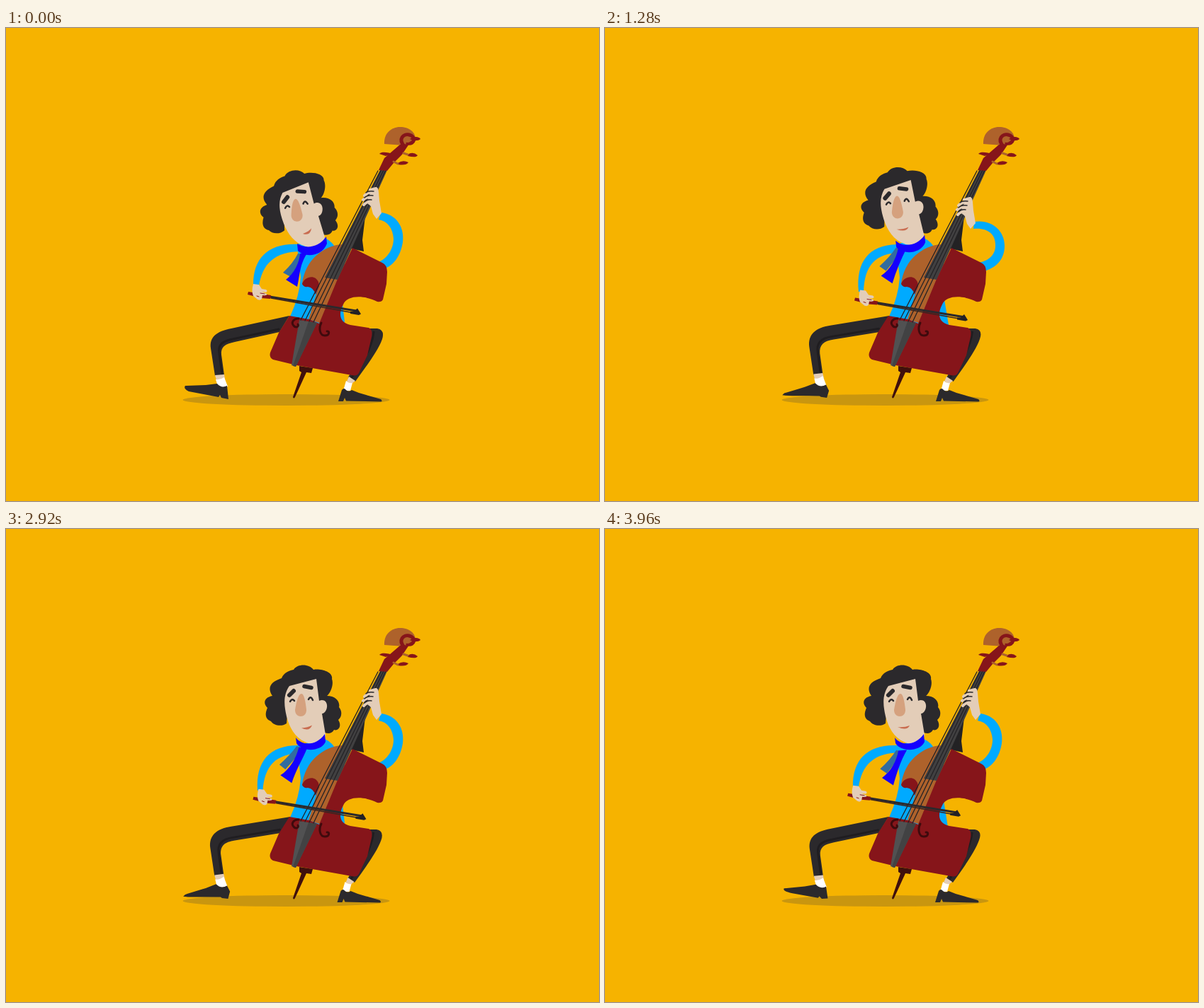
Recreate the animation shown at these times as an HTML page. Size 837x669 px, loop 4000 ms.

```html
<!DOCTYPE html>
<html lang="en">
<head>
<meta charset="utf-8">
<title>Cellist</title>
<style>
html, body { margin: 0; width: 100%; height: 100%; overflow: hidden; background: #f6b300; }
svg { display: block; width: 100%; height: 100%; }
.black { fill: #2b292c; } .skin { fill: #e3cdb8; } .blue { fill: #00aaff; }
.red { fill: #86151a; } .tan { fill: #ae622b; } .royal { fill: #1400ff; }
.line { fill: none; stroke-linecap: round; stroke-linejoin: round; }
.ink { stroke: #2b292c; }
</style>
</head>
<body>
<svg viewBox="0 0 837 669">
  <ellipse cx="395.5" cy="526" rx="146" ry="8" fill="#c9960f"/>

  <!-- legs -->
  <path id="thigh" class="black"/>
  <path id="thighShade" class="line" stroke="#1f1d20" stroke-width="3"/>
  <path id="ankle" class="skin"/>
  <path id="sock" fill="#fff"/>
  <path id="shoe" class="black"/>
  <path id="rightLeg" class="black"/>
  <path id="rightShade" class="line" stroke="#1f1d20" stroke-width="3"/>
  <g id="rightFoot">
    <path class="skin" d="M484 493L493 499L488 503L481 500Z"/>
    <path fill="#fff" d="M480 499Q484 503 489 502L486 513H476Z"/>
    <path class="black" d="M469 528L474 512Q477 508 480 512Q484 515 488 512L498 516L529 525Q532 528 529 528.500L480 527.500L478 523L476 528Z"/>
  </g>

  <!-- torso, sleeves, scarf and head -->
  <path id="fretSleeve" class="blue"/>
  <path id="torso" class="blue"/>
  <path id="bowSleeve" class="blue"/>
  <path id="scarfBack" fill="#326c9f"/>
  <path id="scarfFront" class="royal"/>
  <g id="head">
    <path class="black" d="M396 275C389 280 378 278 374 272C366 269 365 262 369 253C362 246 365 238 376 236C368 224 374 216 389 211C392 203 400 200 406 199C412 190 428 191 434 199C444 197 462 202 460 212C463 220 458 232 453 236C465 236 472 244 470 252C475 258 474 266 469 270C475 280 468 286 463 284C460 290 453 290 448 287L438 240V225L400 230Z"/>
    <path class="skin" d="M400 222L438 212L442 243C449 240 454 245 453 252C452 259 448 261 446 261L451 291C449 306 431 306 422 301C408 295 400 281 396 265C391 244 393 232 400 222Z"/>
    <path class="line ink" stroke-width="6" d="M400 235L406 229"/>
    <path class="line ink" stroke-width="5.500" d="M421 222.500L431 224.500"/>
    <path class="line ink" stroke-width="2.500" d="M401 244Q404 239 407 243M427 241Q430 235 433 242"/>
    <path fill="#d5a17e" d="M417 233C412 233 409 249 408 256C408 268 424 268 424 256C423 246 421 233 417 233Z"/>
    <path id="mouth" fill="#c96c50"/>
  </g>
  <path id="collar" class="royal"/>

  <!-- cello -->
  <path d="M508 258L503 300L505 316L487 312Z" fill="#232224"/>
  <path class="tan" d="M474 306C448 308 422 328 418 362L441 366L437 380L427 412L445 418L480 345Z"/>
  <path class="red" d="M489 311L531 332Q538 335 538 345L537 362L532 384Q530 388 524 387C507 378 482 377 476 391C468 406 472 417 486 420L512 424Q518 427 516 437L510 463L498 488Q495 493 488 491L410 477L377 469Q371 466 373 459L385 431L400 407L428 412L442 418L468 355Z"/>
  <path class="red" d="M418 362C421 353 431 350 437 354Q442 358 442 365L437 377Q434 367 426 366Q420 367 418 362Z"/>
  <path d="M529 199L538 201L468 356L450 353Z" fill="#414041"/>
  <path d="M414 413L439 417L409 479L403 477Z" fill="#515152"/>
  <path d="M427 415L439 417L409 479L405 478Z" fill="#424243"/>
  <path class="line" stroke="#242225" stroke-width="1.300" d="M525 202L416 413M530 200L422 414M533 201L428 415M536 201L434 416"/>
  <path class="line" stroke="#3f0a0d" stroke-width="3" d="M445 417C441 425 443 435 450 435C457 435 457 428 453 429M413 411C406 410 402 417 406 421C409 425 414 422 412 419"/>
  <path d="M414 478L433 481L431 488L424 487L408 522Q406 525 405 522L417 487L414 485Z" fill="#40100c"/>
  <path class="tan" d="M534 164C533 149 544 140 556 140C569 140 579 147 578 160L562 166Z"/>
  <path class="red" d="M526 201L534 184L556 165L569 164L559 179L547 191L538 202Z"/>
  <path class="line" stroke="#86151a" stroke-width="5" d="M562 167C553 157 561 149 569 151C579 153 577 165 567 163"/>
  <circle class="tan" cx="567" cy="158" r="4"/>
  <path class="red" d="M570 157C576 152 584 154 585 157C582 160 575 160 570 157ZM527 178C530 174 540 176 546 178L536 181ZM567 179Q574 174 581 180Q579 184 567 181ZM553 191Q560 186 568 190Q565 195 553 193Z"/>
  <path class="line" stroke="#ae622b" stroke-width="3" d="M561 177L567 179M547 189L553 192"/>

  <!-- hands and bow -->
  <g id="fretHand">
    <path class="skin" d="M520 227Q525 222 526 232L527 244L530 262L523 270L518 263L515 252L509 247L513 236Z"/>
    <path class="line" stroke="#e3cdb8" stroke-width="4" d="M522 227L514 229M521 233Q511 231 506 237M520 239Q511 237 504 243M518 246Q510 244 505 250"/>
    <path class="line ink" stroke-width="1.500" d="M519 231Q511 230 508 233M518 237Q510 236 506 240M516 243Q510 242 506 246"/>
  </g>
  <g id="bow">
    <path class="line" stroke="#2b292c" stroke-width="3" d="M372 380L494 400"/>
    <path class="line" stroke="#3b2520" stroke-width="1.500" d="M374 382L491 403"/>
    <path fill="#242225" d="M486 401L491 401L496 396.500L501 404.500L498 406L486 404Z"/>
    <path class="red" d="M342 373L374 378L373 383L360 382L341 377Z"/>
    <path class="skin" d="M349 362L357 363L361 369L367 370Q370 372 367 374L361 373L368 376Q369 379 362 378L361 383Q359 386 355 384L349 379Q346 372 349 362Z"/>
    <path class="line" stroke="#86151a" stroke-width="1" d="M359 375L365 376M354 379L357 380"/>
  </g>
</svg>
<script>
const LOOP = 4000, STEP = 40;
const keyTimes = [0, 480, 1280, 1920, 2560, 3280, 3960];
const tracks = {
  tilt:  [1, .3, .57, .3, 0, 0, 0],
  sink:  [6, 1.5, 3, 1.5, 0, 0, 0],
  foot:  [0, .3, .7, 1, 1, .45, .15],
  step:  [0, -2, -2, -2, -3, 0, -3],
  bow:   [0, 1, 1, 1, 1, .35, .1],
  fret:  [0, .6, 1, .6, 0, 0, 0],
  scarf: [1, .15, .4, .1, 0, .3, .55],
  waist: [0, 1, 1, .4, 0, 0, .8],
  smile: [0, 0, 1, 0, 0, 1, 1]
};

// Each path moves between two poses, driven by one track.
const morphs = {
  thigh: ["foot",
    "M400 407L318 425C297 429 287 437 289 453L295 492L308 491L304 462C303 451 309 447 323 444L386 430Z",
    "M402 407L318 419C296 422 286 433 288 450L294 490L307 488L303 460C302 447 308 441 323 439L388 430Z"],
  thighShade: ["foot",
    "M385 426L320 440C304 443 299 449 301 460L305 490",
    "M387 425L320 435C304 437 298 445 300 458L304 488"],
  ankle: ["foot",
    "M295 491L308 490L309 497L297 498Z",
    "M294 489L307 487L309 495L296 497Z"],
  sock: ["foot",
    "M296 497Q302 498 308 494L313 507Q306 511 299 507Z",
    "M295 495Q301 496 307 491L312 504Q305 508 297 505Z"],
  shoe: ["foot",
    "M253 506L282 505L298 503Q304 510 312 506L314 525L304 523L302 519L300 522L258 514Q250 510 253 506Z",
    "M253 521L282 509L296 502Q303 509 312 504Q317 508 317 523L306 523L304 520L302 523L257 525Q249 525 253 521Z"],
  rightLeg: ["step",
    "M508 425L524 425Q535 427 531 440C525 457 508 479 493 500L483 494L500 464Z",
    "M508 425L522 425Q533 427 528 440C522 457 506 479 491 500L482 494L499 464Z"],
  rightShade: ["step",
    "M519 430C517 450 504 473 488 494",
    "M518 430C516 450 502 473 487 494"],
  torso: ["waist",
    "M410 306L450 297Q461 302 466 313L475 390L478 416L440 420L401 408Q414 380 416 353L412 318Z",
    "M410 306L450 297Q461 302 466 313L480 390L485 420L440 422L401 408Q414 380 416 353L412 318Z"],
  bowSleeve: ["bow",
    "M349 363C349 325 371 304 412 306L418 316C378 316 362 334 357 365Z",
    "M358 373C354 331 372 307 412 306L418 318C382 318 366 335 365 374Z"],
  fretSleeve: ["fret",
    "M529 261C550 263 563 281 560 303C557 322 547 337 532 341L526 331C542 324 547 308 547 298C546 284 539 273 526 271Z",
    "M521 274C545 270 564 286 564 308C564 328 551 340 534 344L526 332C542 330 552 320 551 306C551 291 539 282 520 284Z"],
  scarfFront: ["scarf",
    "M413 307L425 308C420 324 408 339 402 358L386 347C399 339 409 323 413 307Z",
    "M415 319L427 316C414 333 415 350 411 366L395 356C407 347 414 332 415 319Z"],
  scarfBack: ["scarf",
    "M410 305L421 309Q407 322 393 338L385 331Q400 318 410 305Z",
    "M412 319L423 320Q412 336 402 352L391 346Q405 333 412 319Z"],
  collar: ["tilt",
    "M409 295C418 307 438 307 450 290L451 301C444 316 417 315 410 303Z",
    "M411 305C421 312 441 312 452 295L453 305C445 325 420 324 412 315Z"],
  mouth: ["smile",
    "M421 283Q430 281 434 277Q431 288 421 283Z",
    "M413 280Q422 281 430 278Q426 286 413 280Z"]
};

const mix = (a, b, k) => a + (b - a) * k;
const get = id => document.getElementById(id);
const place = (id, value) => get(id).setAttribute("transform", value);

function mixPath(a, b, k) {
  const ends = b.match(/-?[\d.]+/g);
  let i = 0;
  return a.replace(/-?[\d.]+/g, n => mix(+n, +ends[i++], k).toFixed(2));
}

function sample(values, time) {
  let i = 0;
  while (i < keyTimes.length - 2 && time >= keyTimes[i + 1]) i++;
  const k = Math.min(1, (time - keyTimes[i]) / (keyTimes[i + 1] - keyTimes[i]));
  return mix(values[i], values[i + 1], (1 - Math.cos(Math.PI * k)) / 2);
}

function draw(now) {
  const time = Math.floor(now % LOOP / STEP) * STEP;
  const pose = {};
  for (const name in tracks) pose[name] = sample(tracks[name], time);
  for (const id in morphs) {
    const [track, from, to] = morphs[id];
    const amount = track === "step" ? -pose.step / 3 : pose[track];
    get(id).setAttribute("d", mixPath(from, to, amount));
  }
  place("head", `translate(0 ${pose.sink}) rotate(${-7.3 * pose.tilt} 435 300)`);
  place("rightFoot", `translate(${pose.step} 0)`);
  place("bow", `translate(${11 * pose.bow} ${8.5 * pose.bow})`);
  place("fretHand", `translate(${-7 * pose.fret} ${14 * pose.fret})`);
  requestAnimationFrame(draw);
}
draw(performance.now());
</script>
</body>
</html>
```
